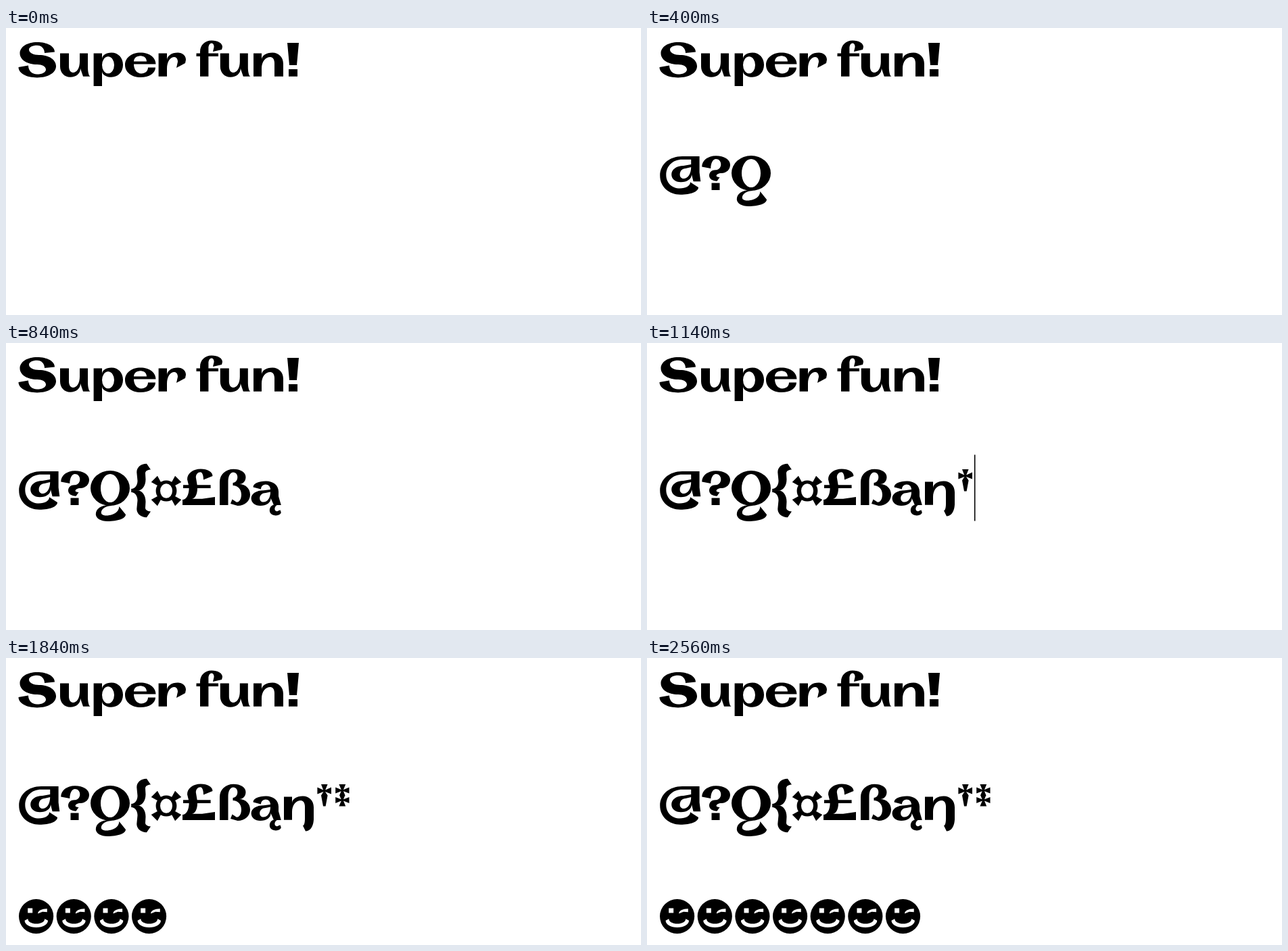
Animation, 939 px wide and 425 px high, one loop 2.6 s. Source, as an HTML page:

```html
<!DOCTYPE html>
<html lang="en">
<head>
<meta charset="utf-8">
<title>Super fun!</title>
<style>
  html, body { margin: 0; width: 100%; height: 100%; overflow: hidden; background: #fff; }
  svg { display: block; width: 939px; height: 425px; fill: #000; fill-rule: evenodd; }
</style>
</head>
<body>
<svg id="stage" viewBox="0 0 939 425" role="img" aria-label="Super fun! @?Q{¤£ßąŋ†‡ 😉😉😉😉😉😉😉"></svg>
<script>
const LOOP = 2600;
const PITCH = 55.65;
const ROUND = 0.58;
const stage = document.getElementById("stage");
const parts = [];

function add(tag, attrs, parent = stage) {
  const el = document.createElementNS("http://www.w3.org/2000/svg", tag);
  for (const key in attrs) el.setAttribute(key, attrs[key]);
  return parent.appendChild(el);
}

// Outline shorthand: c = quarter turn that leaves level, d = quarter turn
// that leaves upright, O = oval (centre, radii); the rest is plain SVG.
function outline(code) {
  let x = 0, y = 0;
  return code.replace(/([A-Za-z])([^A-Za-z]*)/g, (all, cmd, args) => {
    const [a, b, rx, ry] = args.trim().split(/\s+/).map(Number);
    if (cmd === "Z") return all;
    if (cmd === "O") {
      const arc = `a${rx} ${ry} 0 0 1 `;
      return `M${a - rx} ${b}${arc}${2 * rx} 0${arc}${-2 * rx} 0Z`;
    }
    const [px, py] = [x, y];
    if (cmd === "V") y = a;
    else x = a;
    if (cmd !== "V" && cmd !== "H") y = b;
    const dx = (x - px) * ROUND, dy = (y - py) * ROUND;
    if (cmd === "c") return `C${px + dx} ${py} ${x} ${y - dy} ${x} ${y}`;
    if (cmd === "d") return `C${px} ${py + dy} ${x - dx} ${y} ${x} ${y}`;
    return all;
  });
}

function shape(parent, code, transform = "") {
  add("path", { d: outline(code), transform }, parent);
}

function show(el, on, off = LOOP) {
  parts.push({ el, on, off });
}

function key(time) {
  const g = add("g", {});
  show(g, time);
  return (code, transform) => shape(g, code, transform);
}

function caret(on, off, x, y = 165.5) {
  show(add("rect", { x, y, width: 1.6, height: 98 }), on, off);
}

const move = (x, y = 0) => `translate(${x} ${y})`;
const flip = y => `translate(0 ${2 * y}) scale(1 -1)`;

// Heading
const letterU = "M80 37.4H93V57d99 66c109 50V37.4H121V58d125 71.7H114L110 60d95 72.8c80 57Z";
const letterN = "M366 37.4H378V47d394 36.6c410 53V71.7H397V52d391 43c378 60V71.7H366Z";
const head = key(0);
head("M46 21c72 35.5L57 37d46 25.8c34 32d49 40c74 56.5d46 73.4c18.5 58L33 55.5d46 68.6c59 61.5d46 54c20.5 37.5d46 21Z");
head(letterU);
head("M129.6 37.4H142V46d156 36.6c173 54.6d156 72.8c142 64V86H129.6ZO151 54.8 9 12.5");
head("M221.5 53.6H189d200 67.5c210 58.5H221d199 73c176 54.7d199 36.5c221.5 53.6ZM189 49.6H208d199 41.2c189 49.6Z");
head("M225.6 37.4H238V48d254 36.6c266 47L265 52L252 59L254 50d249 43c238 60V71.7H225.6Z");
head("M281.5 37.4H287V35d304 18.5c320 28L319 32L306 35L307.6 28d304 22.6c299.4 30V37.4H314V42H299.4V71.7H287V42H281.5Z");
head(letterU, move(236.8));
head(letterN);
head("M416 22H433L430 55H419ZM418 61H431V71.7H418Z");

// Typed line
key(120)("M77.6 190V214L79.3 227.3H68.6L66 217d50 228.3c36.2 217d54 204L65.2 202V194.8H52c28.3 217.5d48.5 237.6c64 228.3L76 236d49.5 246.8c19.2 218.6d52 190ZM65.2 206L57 208c48.6 217d54 223c65.2 206Z");

key(240)("M81.2 205.5d102 189.3c123 202.6d110 215c102.6 219d107.5 221L103.5 226.8c92 218.6d101 210.3c109.3 202d102 194c94.3 208ZM95.5 229.6H107.5V239.9H95.5Z");
caret(320, 360, 123.4);

const capQ = key(360);
capQ("O154 215 29 26O154 215 14 21");
capQ("M152 240c132.8 253.5d150 264c177 254L167.3 242d148 255.5c140.8 251.5d157 241Z");

const brace = key(440);
const hook = "M208 178.8L214 187.6c206 193L206.5 202d194 218.7H185.2V216c194.5 204L193.3 191.5d208 178.8Z";
brace(hook);
brace(hook, flip(218.5));
caret(480, 540, 213.6);

const coin = key(540);
coin("O237 219 15.4 15.4O237 219 9 10.8");
for (let turn = 45; turn < 360; turn += 90) {
  coin("M-3 -13L-6.5 -25H6.5L3 -13Z", `${move(237, 219)} rotate(${turn})`);
}

key(620)("M262 210.2H270L268 202d288 186.5c305.5 197L292 202.5d287.5 191.2c280.8 199L282.7 210.2H302.6V215H283d274.5 230.8H290L309 228V239.9H261V232c270.6 215H262Z");
caret(660, 740, 311.4);

key(740)("M316 239.9V206d336.5 186.8c354.5 198.5d345 209c361 224.5d342.5 241L332 238L334.5 231.5L341 235.8c348 224.5d335.5 211V207c342.3 198.5d336 191.5c328.5 205V239.9Z");

const ogonekA = key(840);
ogonekA("M365.5 213.5d384.5 204.6c403 220V227L406.8 239.9H396L391.6 230d376 241c362.6 230d381 218.3L391 217d384 209.5c377 216.4ZM391 220.5L384 222c375.2 230d380.6 235.6c391 220.5Z");
ogonekA("M399 239c389.8 248d399 255.4c406.7 250.5L405.4 247.2L401 249.2c397.4 246d404.5 239Z");
caret(880, 940, 407.2);

const eng = key(940);
eng(letterN, move(45, 168));
eng("M455 238d443 256.5L439 248.3c442 238Z");

key(1040)("M466 187H475.6L472.2 195.4L481 191.6V201.4L472 198L475.6 203.5L472.6 219.5H469L466 203.5L469.5 198L460.4 201.4V191.6L469.2 195.4Z");
caret(1140, 1380, 483.9);

const dagger = key(1380);
const cross = "M492.4 187H502.2L499 195L507.5 191.4V200.4L499 197.2L501.5 203.4H493L495.6 197.2L487.2 200.4V191.4L495.8 195Z";
dagger(cross);
dagger(cross, flip(203.25));

// Smileys
const face = "O44.6 382.6 25.6 25.6";
const eyes = "M32.2 370.6H39.2V377.4H32.2ZM47.2 378.4d60.8 371.3V376.2L54 375.7Z";
const smile = "M27.6 388.8L32.4 386.2d44.8 393.5c57.2 386.2L62 388.8d44.8 399c27.6 388.8Z";
[1480, 1620, 1700, 1840, 1960, 2060, 2180].forEach((time, i) =>
  key(time)(face + eyes + smile, move(i * PITCH)));

const winkCaret = (on, off, count) => caret(on, off, 16.1 + PITCH * count, 333.5);
winkCaret(1640, 1700, 2);
winkCaret(1900, 1960, 4);
winkCaret(2100, 2180, 6);
winkCaret(2340, 2560, 7);

function draw(t) {
  for (const { el, on, off } of parts) {
    el.style.visibility = t >= on && t < off ? "visible" : "hidden";
  }
}

const start = performance.now();
function tick() {
  draw((performance.now() - start) % LOOP);
  requestAnimationFrame(tick);
}
draw(0);
requestAnimationFrame(tick);
</script>
</body>
</html>
```
